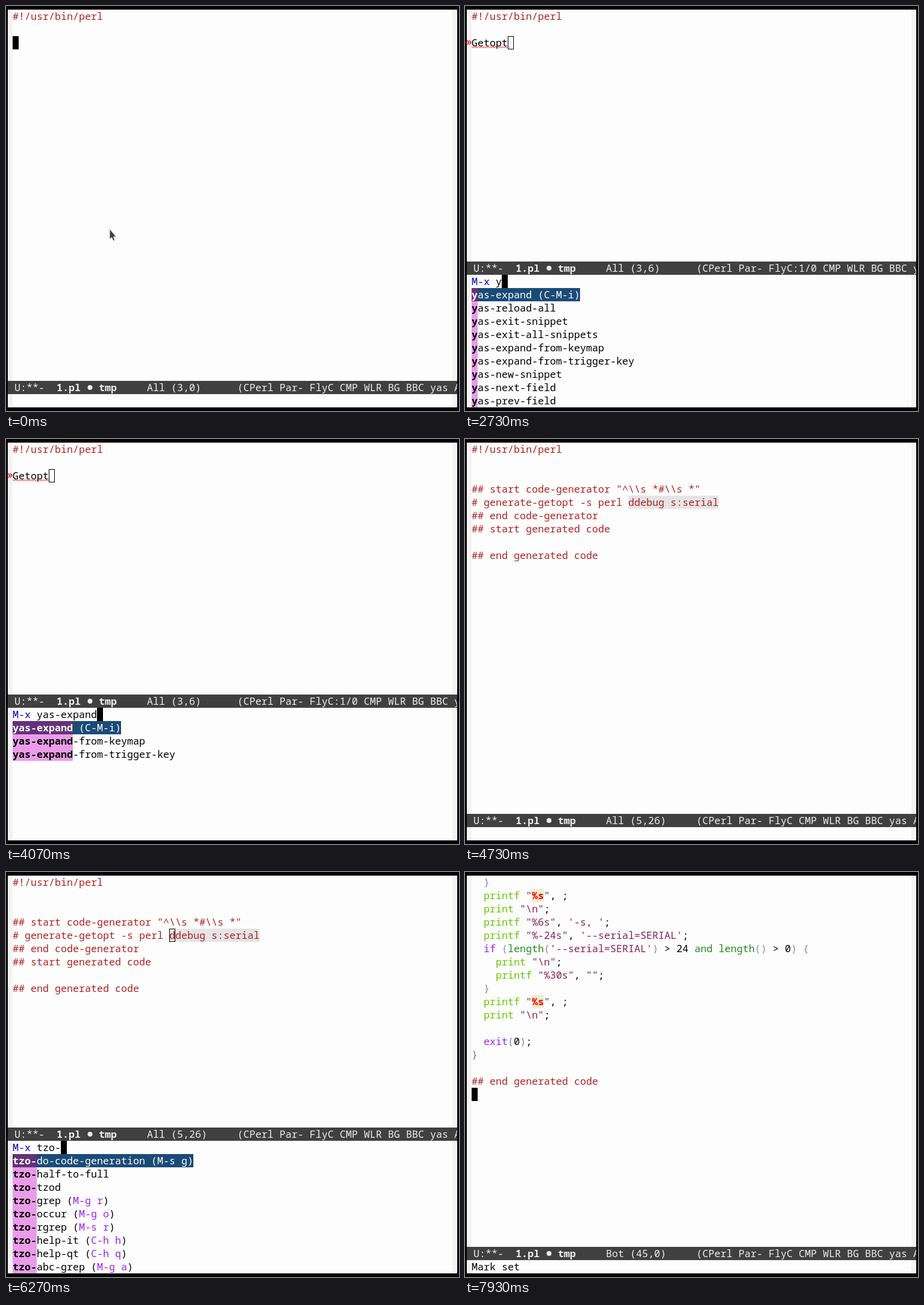
Write an HTML page with a canvas that moves like this. It is 752 by 672 pixels and loops after 8 s.

```html
<!DOCTYPE html>
<html lang="en">
<head>
<meta charset="utf-8">
<title>Snippet expansion in an editor</title>
<style>
html, body { margin: 0; width: 100%; height: 100%; overflow: hidden; background: #000; }
canvas { display: block; }
</style>
</head>
<body>
<canvas id="stage" width="752" height="672"></canvas>
<script>
const ctx = document.getElementById('stage').getContext('2d');
const LOOP = 8000, CELL = 10, ROW = 22, LEFT = 11, TOP = 6;
const PAPER = '#fdfdfd', FRINGE = '#f3f3f3', FIELD = '#e5e5e5', INK = '#000';
const COMMENT = '#b22222', STRING = '#8b2252', KEYWORD = '#a020f0', BUILTIN = '#66c800', TYPE = '#228b22';
const DELIMITERS = ['#707183', '#7388d6', '#909183', '#709870'];

const SNIPPET = String.raw`#!/usr/bin/perl


## start code-generator "^\\s *#\\s *"
# generate-getopt -s perl ddebug s:serial
## end code-generator
## start generated code

## end generated code`.split('\n');

const GENERATED = String.raw`  }
  printf "%s", ;
  print "\n";
  printf "%6s", '-s, ';
  printf "%-24s", '--serial=SERIAL';
  if (length('--serial=SERIAL') > 24 and length() > 0) {
    print "\n";
    printf "%30s", "";
  }
  printf "%s", ;
  print "\n";

  exit(0);
}

## end generated code`.split('\n');

const RECENT = ['yas-expand (C-M-i)', 'yas-reload-all', 'disable-theme',
  'tzo-do-code-generation (M-s g)', 'dark', 'light', 'dorim-mode', 'mu4e', 'edebug-defun'];
const COMMANDS = ['yas-expand (C-M-i)', 'yas-reload-all', 'yas-exit-snippet',
  'yas-exit-all-snippets', 'yas-expand-from-keymap', 'yas-expand-from-trigger-key',
  'yas-new-snippet', 'yas-next-field', 'yas-prev-field',
  ...['do-code-generation (M-s g)', 'half-to-full', 'tzod', 'grep (M-g r)', 'occur (M-g o)',
    'rgrep (M-s r)', 'help-it (C-h h)', 'help-qt (C-h q)', 'abc-grep (M-g a)'].map(s => 'tzo-' + s)];

function rect(x, y, w, h, color) {
  ctx.fillStyle = color;
  ctx.fillRect(x, y, w, h);
}

// Text on the character grid; y is the top of the row.
function text(str, x, y, color = INK, bold = false) {
  ctx.font = `${bold ? 'bold ' : ''}16.667px "Noto Sans Mono", "DejaVu Sans Mono", monospace`;
  ctx.fillStyle = color;
  [...str].forEach((ch, i) => ctx.fillText(ch, x + i * CELL, y + 17));
}

const colX = col => LEFT + col * CELL;
const rowY = row => TOP + row * ROW;
const typed = (str, times, t) => str.slice(0, times.filter(k => k <= t).length);

function drawLines(lines) {
  const token = /^#.*|"[^"]*"|'[^']*'|\w+|[(){}]|\S/g;
  const words = { print: BUILTIN, printf: BUILTIN, length: TYPE, and: TYPE, if: KEYWORD, exit: KEYWORD };
  let depth = 2;
  lines.forEach((line, row) => {
    for (const { 0: s, index } of line.matchAll(token)) {
      const x = colX(index), y = rowY(row);
      let color = words[s] || INK;
      if (s[0] === '#') color = COMMENT;
      else if (/^["']/.test(s)) color = STRING;
      else if (/[({]/.test(s)) color = DELIMITERS[depth++];
      else if (/[)}]/.test(s)) color = DELIMITERS[--depth];
      if (s === '"%s"') {
        text('"  "', x, y, color);
        rect(x + CELL, y, 2 * CELL, ROW, '#eeeed1');
        text('%s', x + CELL, y, '#f00', true);
      } else text(s, x, y, color);
    }
  });
}

function drawCursor(col, row, hollow, under = '') {
  const x = colX(col), y = rowY(row);
  if (hollow) {
    ctx.strokeStyle = INK;
    ctx.lineWidth = 1;
    ctx.strokeRect(x + .5, y + .5, CELL - 1, ROW - 1);
  } else {
    rect(x, y, CELL, ROW, INK);
    text(under, x, y, PAPER);
  }
}

function drawModeLine(y, place, position, check) {
  const color = '#eee';
  rect(3, y, 746, ROW, '#404040');
  text('U:**-', 14, y, color);
  text('1.pl   tmp', 84, y, color, true);
  ctx.beginPath();
  ctx.arc(139.5, y + 11, 4, 0, 2 * Math.PI);
  ctx.fill();
  text(`${place} (${position})`, 234, y, color);
  text(`(CPerl Par- ${check} CMP WLR BG BBC yas A`, 384, y, color);
}

function drawMinibuffer(input) {
  const top = 446, n = input.length;
  text('M-x', LEFT, top, '#0000cd');
  text(input, colX(4), top);
  rect(colX(4 + n), top, CELL, ROW, INK);
  const found = input ? COMMANDS.filter(c => c.startsWith(input)) : RECENT;
  found.slice(0, 9).forEach((name, i) => {
    const y = top + ROW * (i + 1), selected = i === 0;
    const color = selected ? '#fff' : INK;
    if (selected) rect(LEFT, y, name.length * CELL, ROW, '#1a4b77');
    rect(LEFT, y, n * CELL, ROW, selected ? '#65317a' : '#e99ce8');
    text(input, LEFT, y, color, true);
    // The key binding in brackets has a colour of its own.
    let col = n;
    name.slice(n).split(/(?<=\()|(?=\))/).forEach((part, k) => {
      text(part, colX(col), y, k === 1 && !selected ? KEYWORD : color);
      col += part.length;
    });
  });
}

function drawError() {
  const y = rowY(2);
  ctx.strokeStyle = '#f00';
  ctx.lineWidth = 1;
  ctx.beginPath();
  for (let x = LEFT; x <= colX(6); x += 2) ctx.lineTo(x, y + 17.5 + (x - LEFT) / 2 % 2 * 2);
  ctx.stroke();
  ctx.lineWidth = 1.4;
  ctx.beginPath();
  for (const x of [3.5, 7]) {
    ctx.moveTo(x, y + 7);
    ctx.lineTo(x + 3, y + 10.5);
    ctx.lineTo(x, y + 14);
  }
  ctx.stroke();
}

function drawPointer() {
  ctx.fillStyle = '#404040';
  ctx.strokeStyle = '#e8e8e8';
  ctx.lineWidth = 1;
  const arrow = new Path2D('M172 370V387L175.5 384L178 389.5L180.5 388.5L178.5 383H183Z');
  ctx.fill(arrow);
  ctx.stroke(arrow);
}

function draw(t) {
  const within = (a, b) => t >= a && t < b;
  const expanded = t >= 4270, generated = t >= 6930, atEnd = t >= 7870;
  const prompt = within(2400, 4200) || within(5600, 6670);
  const failing = within(2270, 4270);

  rect(0, 0, 752, 672, INK);
  rect(3, 6, 746, 660, FRINGE);
  rect(11, 6, 730, 660, PAPER);
  ctx.save();
  ctx.beginPath();
  ctx.rect(3, 6, 746, 660);
  ctx.clip();

  const times = [1000, 1130, 1270, 1470, 1670, 1800];
  const word = typed('Getopt', times, t);
  let col = word.length, row = 2, line = 3, under = '';
  let shownCol = typed('Getopt', times, t - 65).length;
  if (generated) {
    col = shownCol = 0;
    row = atEnd ? 16 : 14;
    line = row + 29;
  } else if (expanded) {
    col = shownCol = 26;
    row = 4;
    line = 5;
    under = 'd';
    rect(colX(26), rowY(4), 15 * CELL, ROW, FIELD);
  }

  drawLines(generated ? GENERATED : expanded ? SNIPPET : [SNIPPET[0], '', word]);
  if (failing) drawError();

  const blinkedOff = within(200, 600) || within(4670, 5070) || within(7330, 7800);
  if (!blinkedOff) drawCursor(col, row, prompt, under);

  drawModeLine(prompt ? 424 : 622, generated ? 'Bot' : 'All', `${line},${shownCol}`,
    failing ? 'FlyC:1/0' : 'FlyC');
  if (prompt) {
    drawMinibuffer(expanded
      ? typed('tzo-do', [5870, 6000, 6070, 6200, 6400, 6530], t)
      : typed('yas-expand', [2670, 2800, 2930, 3070, 3270, 3400, 3530, 3670, 3870, 4000], t));
  }
  if (atEnd) text('Mark set', LEFT, 644);
  if (t < 1000) drawPointer();
  ctx.restore();
}

function tick(now) {
  draw(now % LOOP);
  requestAnimationFrame(tick);
}
draw(0);
requestAnimationFrame(tick);
</script>
</body>
</html>
```
